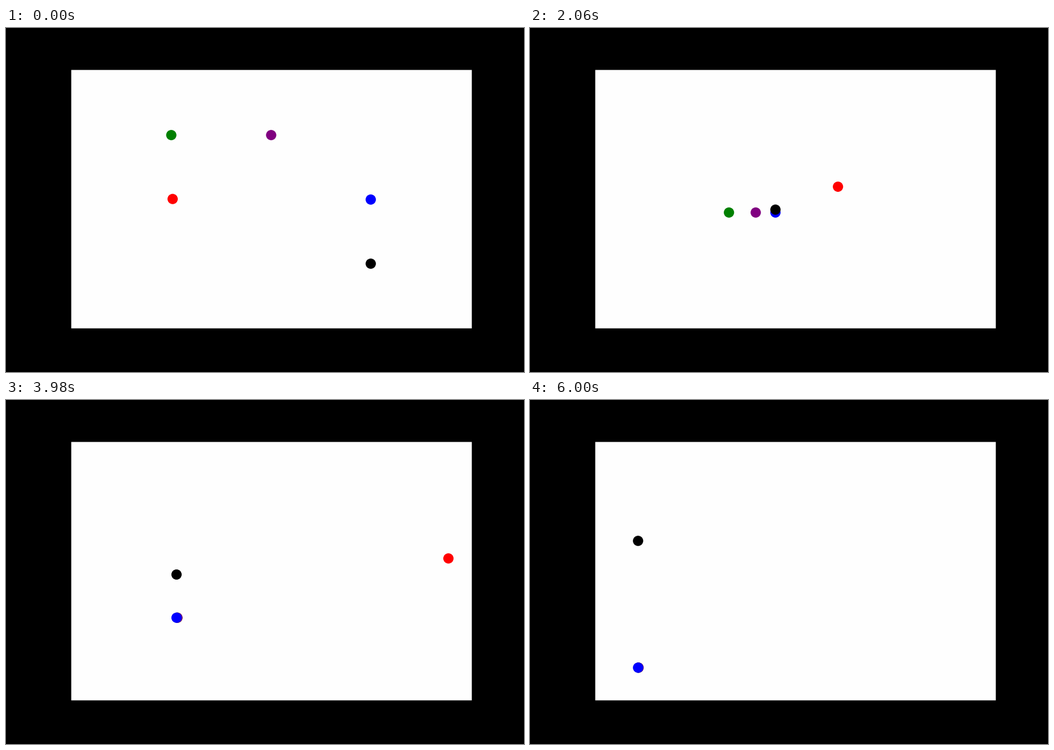
Animation, 917 px wide and 611 px high, one loop 6020 ms. Source, as a matplotlib script:

```python
import numpy as np
import matplotlib.pyplot as plt
from matplotlib.animation import FuncAnimation
from matplotlib.patches import Circle

W, H, DPI = 917, 611, 64
FRAMES, STEP = 301, 20
LEFT, RIGHT, TOP, BOTTOM = 115.5, 824.6, 74.5, 533.5
RADIUS = 9.1
MEET_X, MEET_Y = 129, 93


def move(start, *legs):
    """Chain legs (end step, end value, gain); gain > 0 speeds a leg up."""
    t = np.arange(FRAMES)
    out = np.full(FRAMES, float(start))
    t0, a = 0, start
    for t1, b, gain in legs:
        u = np.clip((t - t0) / (t1 - t0), 0, 1)
        out += (b - a) * (u - gain * u * (1 - u))
        t0, a = t1, b
    return out


# After meeting, the balls drift on together.
trail_x = [(MEET_X, 380.5, 0.2), (300, 192.1, 0)]
drift_y = [(199, 386.7, 0.32), (300, 475.4, 0.06)]

right_x = move(645.7, (MEET_X, 378.5, 0.05), (300, 191.3, 0))
top_y = move(190.2, (MEET_Y, 323.5, 0.02), *drift_y)

balls = [
    ("red",
     move(295, (56, 443, 0), (103, 545.2, -0.14), (199, 783.2, 0.07), (300, 1048, 0)),
     move(303.7, (54, 272.5, -0.15), (145, 286, -0.63), (217, 278.5, 0.72))),
    ("green", move(292.6, (MEET_Y, 343.4, 0), *trail_x), top_y),
    ("purple", move(469.4, (47, 424.5, 0), (103, 399.6, -0.7), *trail_x), top_y),
    ("blue", right_x, move(304.7, (MEET_Y, 323.5, -0.2), *drift_y)),
    ("black", right_x,
     move(418.6, (103, 322.6, 0.32), (228, 293.6, 1.87), (300, 250.2, -0.1))),
]

fig = plt.figure(figsize=(W / DPI, H / DPI), dpi=DPI, facecolor="black")
ax = fig.add_axes([LEFT / W, 1 - BOTTOM / H, (RIGHT - LEFT) / W, (BOTTOM - TOP) / H],
                  facecolor="#fefefe")
ax.set(xlim=(LEFT, RIGHT), ylim=(BOTTOM, TOP), xticks=[], yticks=[])
ax.patch.set_snap(False)
for spine in ax.spines.values():
    spine.set_visible(False)

dots = []
for order, (color, xs, ys) in enumerate(balls):
    dot = Circle((xs[0], ys[0]), RADIUS, fc=color, ec="none", zorder=2 + order)
    dots.append(ax.add_patch(dot))


def draw(i):
    for dot, (_, xs, ys) in zip(dots, balls):
        dot.center = xs[i], ys[i]
    return dots


anim = FuncAnimation(fig, draw, frames=FRAMES, interval=STEP, repeat=True,
                     repeat_delay=0, init_func=lambda: draw(0))
plt.show()
```
